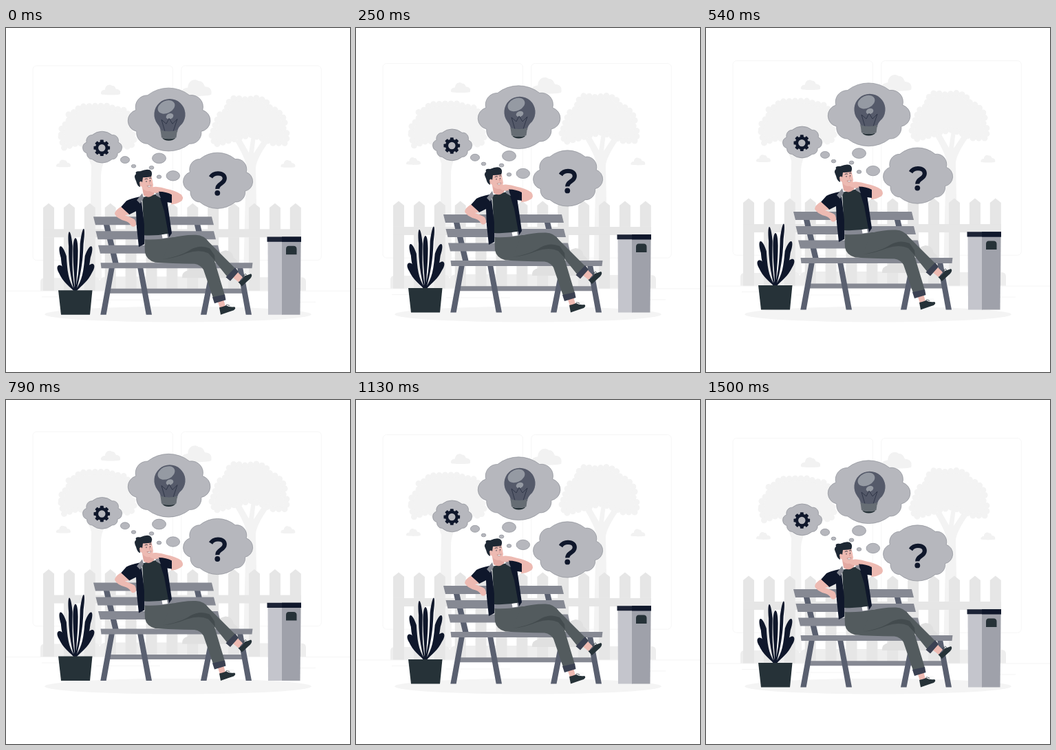
Recreate the animation shown at these times as an HTML page. Size 500 by 500 pixels, loop 1.54 s.

```html
<!DOCTYPE html>
<html lang="en">
<head>
<meta charset="utf-8">
<title>Daydreaming on a bench</title>
<style>
  html, body { margin: 0; width: 100%; height: 100%; overflow: hidden; background: #fff; }
  svg { display: block; width: 100vw; height: 100vh; }
</style>
</head>
<body>
<svg viewBox="0 0 500 500">
  <defs>
    <path id="puff" d="M206 97.500A49 49 0 0 1 267 97.500A17 17 0 0 1 286 119A16 16 0 0 1 284 150A16 16 0 0 1 267 168A49 49 0 0 1 206 168A16 16 0 0 1 190 150A16 16 0 0 1 189 119A17 17 0 0 1 206 97.500Z"
      transform="translate(-237.2 -133)" vector-effect="non-scaling-stroke"/>
    <path id="sky" d="M0 14C-1 9 4 8 6 8C6 2 12 -1 16 2C20 2 21 5 22 7C26 7 29 9 28 14C28 16 0 16 0 14Z"/>
  </defs>

  <ellipse cx="250" cy="416.2" rx="193.8" ry="11.3" fill="#f4f4f4"/>

  <g id="float">
    <g fill="none" stroke="#f4f4f4" stroke-width=".8">
      <rect x="39" y="54.5" width="203.5" height="282.7" rx="5.5"/>
      <rect x="254.8" y="54.5" width="203.5" height="282.7" rx="5.5"/>
      <path stroke="#ebebeb" stroke-width=".5" d="M0 382H500M417 398h33M322 401h9M396 389h19M52 390.5h43M104 390.5h6M131 395h93"/>
    </g>

    <g fill="#f2f2f2">
      <use href="#sky" transform="translate(138 81.5)"/>
      <use href="#sky" transform="translate(255 73.5) scale(1.55 1.62)"/>
      <use href="#sky" transform="translate(73 190.5) scale(.74)"/>
      <use href="#sky" transform="translate(399.5 191) scale(.74)"/>
    </g>

    <g id="trees" fill="#f3f3f3" stroke="#f3f3f3">
      <path stroke="none" d="M121 365L124 200Q121 187 106 168L113 166L128 183L131 160H138L136 192Q137 187 156 166L162 169Q138 191 138 215L139 365Z"/>
      <path stroke="none" d="M345 365L349 198Q347 188 333 164L341 160L353 181L357 156H363L360 182L374 161L381 166Q364 190 363 203L366 365Z"/>
    </g>

    <path fill="#eee" d="M50 381.5V369Q50 363 56 363H79Q83 363 83 366Q84 362 90 362H130Q135 362 136 367Q139 361 146 361H352Q357 361 359 365Q362 362 368 362H429Q436 362 436 368V381.5Z"/>
    <g id="fence" fill="#e6e6e6"></g>
    <path fill="#e0e0e0" d="M256 363Q255 354 265 352Q270 343 282 346Q293 348 295 358V363ZM305 335Q308 325 319 323Q329 323 331 334Q339 337 338 350V363H302Z"/>

    <g id="plant" fill="#0f172b"></g>
    <path fill="#263238" d="M76 381H125.5L122 416.5H80Z"/>

    <g id="bin">
      <path fill="#c4c5cc" d="M380.5 309H402V416.5H381Z"/>
      <path fill="#9fa1aa" d="M401 309H428.5L427.5 416.5H401Z"/>
      <path fill="#1c2336" d="M379.5 303.2H429V310.4H379.5Z"/>
      <path fill="#0f172b" d="M401 303.2H429V310.4H401Z"/>
      <path fill="#263238" d="M407 329V321Q407 316.5 411 316.5H418Q422.5 316.5 422.5 321V329Z"/>
    </g>

    <g id="bench">
      <path fill="#5a6070" d="M141.5 284H150L164 343H155.5ZM273.5 284H282L296 343H287.5Z"/>
      <path fill="#868993" d="M127 274H299L302 286H130ZM130.5 295H302L305 307H133.5ZM134 315.5H308L311 327.5H137ZM148 378.4H346L348 385.4H148Z"/>
      <path fill="#5a6070" d="M150 347H158L145.7 416.5H137.3ZM191 347H199L212 416.5H203.7ZM297 347H305L291.5 416.5H283ZM336 347H344L357 416.5H348.7Z"/>
      <path fill="#868993" d="M137.5 341H358.5L357.5 349H138.5Z"/>
    </g>

    <g id="man">
      <!-- ankles and shoes -->
      <path fill="#edbab2" d="M307 395L316 393L319 405L311 407ZM328 361L336 354L344 362L338 369Z"/>
      <path fill="#263238" d="M310 406Q315 405 320 403Q325 406 332 405Q335 407 331 410Q324 412 312 416.5ZM337.5 369Q344 366 347 360Q351 359 356 357Q359 359 355 364L343 375Z"/>
      <path fill="none" stroke="#263238" stroke-width=".7" d="M319 404q2 -4 4 -1q1 -2 2 1M345 363q-2 -5 2 -4q0 -4 3 0"/>
      <!-- trousers -->
      <path fill="#535b5e" d="M201 304L242 304Q276 303 294 314Q303 322 303 338L318 388L301 392L287 351Q283 344 274 342.5Q240 342 217 340.5Q204 337 202 326Z"/>
      <path fill="#535b5e" d="M240 305Q258 300 276 300.5Q288 301 295 311L335 351L323 363L294 327Q280 319 262 324L228 336Z"/>
      <path fill="#434b4e" d="M228 336Q255 331 268 322Q282 314 296 320L303 330L304 338L294 327Q281 321 263 327Q246 334 228 336Z"/>
      <path fill="#3b4152" d="M300 391L318 387L319.5 395L303 400ZM319.5 362L333 348L338 354L326 367.5Z"/>
      <!-- raised arm -->
      <path fill="#edbab2" d="M240 242.5L244 243Q232 240 221 239Q213 239 209 236Q212 230 218 230.5Q226 231 233 233.5Q247 236 255 242Q260 249 253 252.5Q247 256 240 256Z"/>
      <!-- torso -->
      <path fill="#263238" d="M198 246L224 240L234 253L240 300L201 304Z"/>
      <path fill="#868993" d="M201 301Q220 302 240 298L241 304Q222 308 201 307Z"/>
      <path fill="#fff" d="M226.5 300L234 299L235 304.5L227.5 305.5Z"/>
      <path fill="#0f172b" d="M194 245Q180 248 175 251L167 260L179 271L189 266L190 290L193 318L201 314L201 286L197 251ZM222 237.5Q233 237.5 241 242L241 254L234.5 253L241 298L237 304L230 266L224 247Z"/>
      <path fill="#868993" d="M194 245L198 240L200 247L195 255L190 250ZM217 237L222 239.5L225 247L218 243Z"/>
      <!-- resting arm -->
      <path fill="#edbab2" d="M167 259.5L179 270.5L173 272Q182 275 187 278Q190 283 188.5 287Q184 291 181 286Q179 282 174 280.5Q161 277 158 270Q158 265 167 259.5Z"/>
      <!-- head -->
      <path fill="#e3a9a2" d="M197 226L212 234L216 240Q209 249 200 243Z"/>
      <path fill="#edbab2" d="M194 218Q200 211 211 213Q213 222 214 228Q213 237 206 237Q200 236 197 230Q191 229 192 224Z"/>
      <path fill="#1e2834" d="M189 222Q185 214 189 212Q187 207 195 208Q204 204 209 206Q214 209 211 216Q204 217 199 217L198 224Q196 221 194 224L195 231Q191 230 189 222Z"/>
      <path fill="none" stroke="#1e2834" stroke-width=".9" stroke-linecap="round" d="M202 219.5q1.5 -1.5 3.5 -.5M208.5 218q1.500 -1 2.500 0M204 222.3v.9M209.5 221.300v.9"/>
      <path fill="none" stroke="#cf807e" stroke-width=".7" d="M208 222q2.5 3 0 3.500"/>
      <path fill="#fff" stroke="#7a4546" stroke-width=".4" d="M205 229q3 .5 6 -1q-1 3 -3 3q-2 0 -3 -2Z"/>
      <path fill="#edbab2" d="M208 236Q210 230.5 215 231L222 233L220 239.500Q213 240 208 236Z"/>
    </g>

    <g id="thoughts" fill="#b6b7bd" stroke="#80838c" stroke-width=".6">
      <use href="#puff" transform="translate(237 133)"/>
      <use href="#puff" transform="translate(140 173) scale(.475 .5)"/>
      <use href="#puff" transform="translate(308 221.7) scale(.845 .885)"/>
    </g>

    <g id="bulb">
      <path fill="#555a6a" d="M225 151Q225 145 220 139A22.6 22.6 0 1 1 256 139Q249 145 249 151Z"/>
      <ellipse cx="233" cy="114.5" rx="13" ry="9" transform="rotate(-25 233 114.5)" fill="#959aa3"/>
      <ellipse cx="238" cy="128" rx="5.5" ry="4" transform="rotate(-20 238 128)" fill="#959aa3"/>
      <path fill="none" stroke="#2c3344" stroke-width=".9" d="M231 150L226 133L233 139L237 131L242 139L249 132L243 150"/>
      <path fill="#666d74" d="M224.5 148Q237 152 249 148L247.5 159Q237 163 226 159Z"/>
      <path fill="#263238" d="M227 159.5Q237 162.5 246.5 159.5Q243 163.5 236.5 163.5Q230 163.5 227 159.5Z"/>
    </g>
    <g id="gear" transform="translate(139.3 174)" fill="#0f172b"></g>
    <g transform="translate(0 .5)">
      <path fill="none" stroke="#0f172b" stroke-width="6.2" d="M297.5 216Q301 210.5 308 210.5C315 210.5 317.8 214 317.8 217.8C317.8 226 307 225 307.3 233"/>
      <circle cx="307.3" cy="239" r="3.9" fill="#0f172b"/>
    </g>
  </g>
</svg>
<script>
const NS = 'http://www.w3.org/2000/svg';
const $ = id => document.getElementById(id);

function add(parent, tag, attrs) {
  const el = document.createElementNS(NS, tag);
  for (const k in attrs) el.setAttribute(k, attrs[k]);
  return $(parent).appendChild(el);
}

// Foliage: a polygon whose round dotted stroke makes a scalloped edge
function crown(points) {
  add('trees', 'polygon', {
    points, 'stroke-width': 9, 'stroke-linecap': 'round',
    'stroke-linejoin': 'round', 'stroke-dasharray': '0 8.5'
  });
}
crown('80,158 84,174 100,168 118,167 138,166 158,168 181,173 187,160 180,147 184,132 172,119 158,117 148,113 130,113 108,114 99,122 91,125 91,136 81,144');
crown('299,156 304,169 322,164 340,159 356,155 374,161 388,167 407,167 409,154 403,145 406,134 395,120 384,116 377,105 362,101 350,104 332,101 322,109 321,120 310,126 305,138');

for (let i = 0; i < 13; i++) {
  const x = 54 + i * 29.9;
  add('fence', 'path', { d: `M${x} 381.5V261L${x + 8} 254.5L${x + 16} 261V381.5Z` });
}
add('fence', 'rect', { x: 54, y: 292, width: 375, height: 12 });

// Paddle leaf: a thin stalk that widens to half-width w near its rounded tip
function leaf(bx, by, tx, ty, w, bend = 0) {
  const dx = tx - bx, dy = ty - by, len = Math.hypot(dx, dy);
  const nx = -dy / len, ny = dx / len;
  const at = (f, s) => `${bx + dx * f + nx * s} ${by + dy * f + ny * s}`;
  add('plant', 'path', {
    d: `M${at(0, 1)}C${at(.25, bend + 1)} ${at(.45, bend + w)} ${at(.76, w)}` +
       `C${at(.92, w)} ${at(1, w * .5)} ${at(1, 0)}` +
       `C${at(1, -w * .5)} ${at(.92, -w)} ${at(.76, -w)}` +
       `C${at(.45, bend - w)} ${at(.25, bend - 1)} ${at(0, -1)}Z`
  });
}
leaf(100, 382, 92, 296, 2.8, -3);
leaf(101, 382, 113, 291.5, 2.5, 3);
leaf(101, 382, 101, 305, 3.6);
leaf(99, 381, 79, 317, 4.2, -5);
leaf(102, 381, 124, 317, 4.2, 5);
leaf(99, 381, 76, 345, 5, -2);
leaf(102, 381, 127, 343, 5, 2);

for (let i = 0; i < 8; i++)
  add('gear', 'rect', { x: -2.5, y: -11.8, width: 5, height: 5, rx: .8, transform: `rotate(${i * 45})` });
add('gear', 'circle', { r: 7.3, fill: 'none', stroke: '#0f172b', 'stroke-width': 4.2 });

[[173, 191.3, 6.6, 5], [185.5, 200.5, 3.3, 2.4], [222.5, 189, 10, 7.4],
 [211.5, 202.6, 3.4, 2.5], [222.5, 216, 3.3, 2.5], [242.8, 214.5, 9.8, 7.2]]
  .forEach(([cx, cy, rx, ry]) => add('thoughts', 'ellipse', { cx, cy, rx, ry }));

// Linear bob at 24 steps per second
const LOOP = 1540, STEP = 1000 / 24, TURN = 725, SPEED = 1 / 75, REST = .3;

function draw(ms) {
  const t = Math.floor((ms % LOOP + 4.9) / STEP) * STEP;
  const y = REST + (Math.abs(t - TURN) - TURN) * SPEED;
  $('float').setAttribute('transform', `translate(0 ${y.toFixed(3)})`);
}

let start;
function tick(now) {
  start ??= now;
  draw(now - start);
  requestAnimationFrame(tick);
}
draw(0);
requestAnimationFrame(tick);
</script>
</body>
</html>
```
